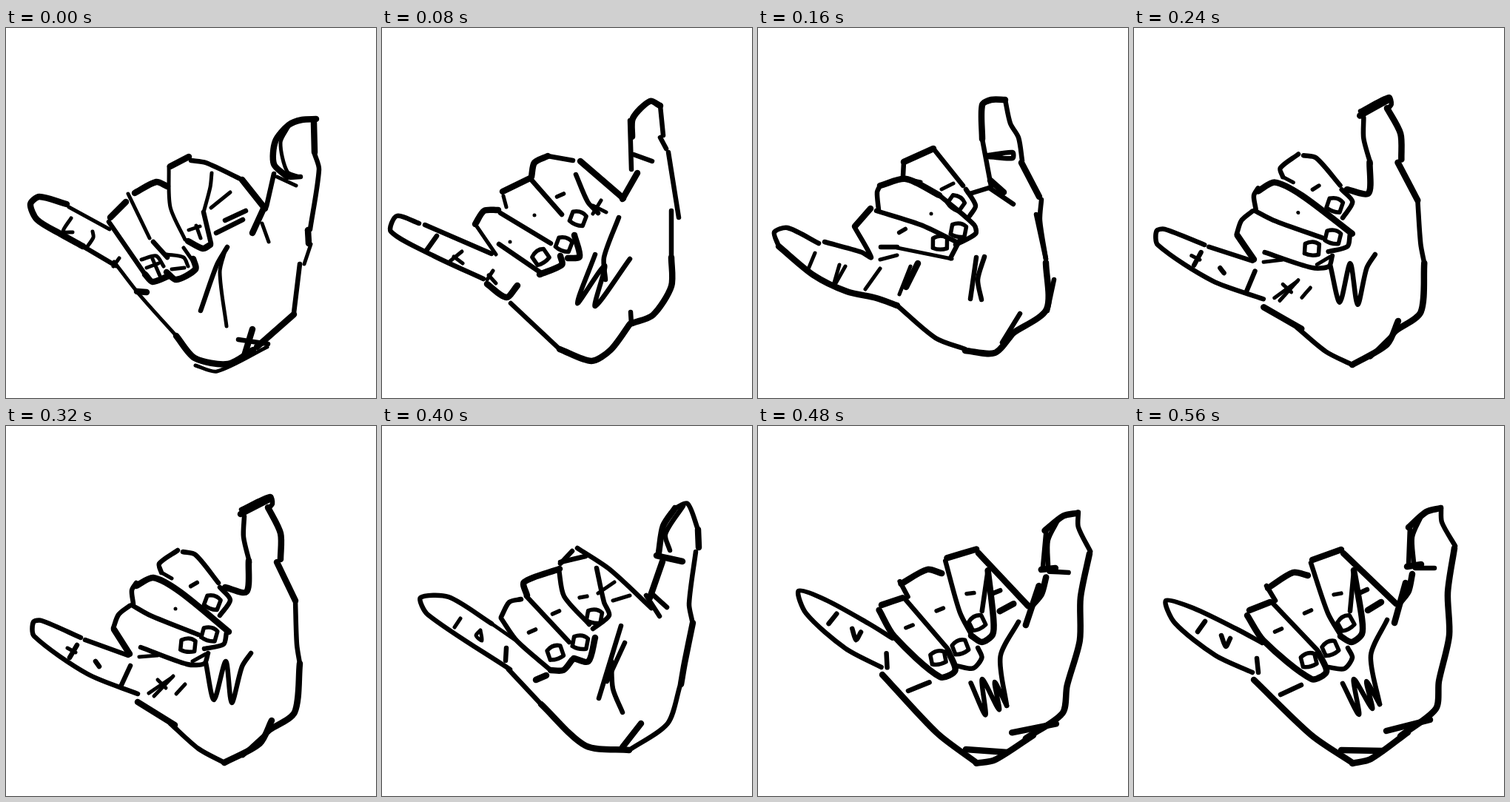
Recreate the animation shown at these times as an HTML page. Size 500 by 500 pixels, loop 640 ms.

```html
<!DOCTYPE html>
<html lang="en">
<head>
<meta charset="utf-8">
<title>Waving hand</title>
<style>
html, body { margin: 0; width: 100%; height: 100%; overflow: hidden; background: #fff; }
svg { display: block; width: 100vw; height: 100vh; }
path { fill: none; stroke: #000; stroke-linecap: round; stroke-linejoin: round; }
</style>
</head>
<body>
<svg id="stage" viewBox="0 0 500 500"></svg>
<script>
const BEAT = 80;

// Smooth curve through the points; sharp turns stay tight.
function curve(text) {
  const pts = text.split(' ').map(p => p.split(',').map(Number));
  const dist = (a, b) => Math.hypot(a[0] - b[0], a[1] - b[1]);
  const slope = i => {
    const a = pts[Math.max(0, i - 1)], b = pts[i], c = pts[Math.min(pts.length - 1, i + 1)];
    const len = dist(a, b) + dist(b, c);
    return [(c[0] - a[0]) / len, (c[1] - a[1]) / len];
  };
  let d = `M${pts[0]}`;
  for (let i = 1; i < pts.length; i++) {
    const a = pts[i - 1], b = pts[i], pull = dist(a, b) * 0.28;
    const s = slope(i - 1), t = slope(i);
    d += `C${a.map((v, k) => v + s[k] * pull)} ${b.map((v, k) => v - t[k] * pull)} ${b}`;
  }
  return d + 'h0';
}

const path = (width, d, move = '') => `<path stroke-width="${width}" d="${d}" transform="${move}"/>`;
const brush = width => (...lines) => lines.map(line => path(width, curve(line))).join('');
const bold = brush(8.5), mid = brush(6.5), fine = brush(5);
const spot = (x, y, turn) => `translate(${x} ${y}) rotate(${turn})`;
const nail = (x, y, turn) => path(5.5, 'M-9 8L-10 -5Q0 -12 9 -7L10 7Q0 11 -9 8', spot(x, y, turn));
const dash = (x, y, turn) => path(5.5, 'M-5 0H5', spot(x, y, turn));

const right = () =>
  bold('419,123 400,124 382,131 364,153 362,184 380,201', '416,128 417,168') +
  mid('417,170 423,191 411,272', '384,202 398,201', '362,197 352,241') +
  fine('382,133 371,155 380,194 397,201', '366,201 392,213', '346,264 355,289', '412,292 403,319') +
  bold('349,242 333,277', '408,273 409,291', '389,387 339,431', '230,416 255,446 300,454 334,435', '333,407 322,443') +
  mid('397,319 389,385', '314,421 354,427') +
  fine('146,316 180,360 230,416', '256,456 285,464 353,431') +
  bold('82,238 45,228 33,238 42,259 75,279 104,295', '177,356 190,357') +
  mid('104,295 148,321') +
  fine('85,242 140,272', '153,311 145,322', '88,257 77,275 90,276', '117,275 118,283 108,298') +
  bold('141,256 162,235', '188,333 198,343 220,335', '174,223 203,208 218,214', '217,330 230,340 256,326 253,312') +
  bold('222,187 247,174', '319,205 350,244', '246,288 266,298 276,293') +
  mid('139,262 188,333', '199,289 218,310', '250,179 270,182 319,205', '267,249 277,291') +
  fine('165,224 194,284', '240,297 254,317', '220,187 222,242 242,286', '278,196 276,215 267,249') +
  fine('303,222 277,243', '247,273 262,268', '257,267 263,284', '217,306 240,310 246,322', '224,326 241,324') +
  fine('183,313 203,308 213,322', '190,324 206,318', '198,312 208,335') +
  mid('284,277 320,259', '296,260 324,247', '299,296 285,320 263,382') +
  fine('297,298 289,330 298,403');

const middleLeft = () =>
  bold('376,105 362,99 339,122 338,147', '345,196 325,231', '391,310 391,349 366,388 338,399') +
  mid('376,105 380,145', '376,148 384,163', '335,125 337,191', '340,171 365,180') +
  mid('387,168 401,256', '391,247 391,310', '336,384 337,400', '174,372 240,434') +
  bold('335,400 309,435 283,450 240,434', '183,348 168,364 142,346') +
  mid('50,264 20,254 12,275 70,308 137,339', '58,266 148,305', '74,281 59,302') +
  fine('92,315 108,302', '97,309 109,318', '144,334 154,345', '150,328 142,340') +
  bold('126,265 138,247 157,246', '163,221 200,203', '213,333 243,320 241,308', '251,311 267,309 260,280') +
  bold('202,201 206,182 224,173', '268,180 326,230') +
  mid('224,173 258,179', '262,198 278,235 292,250', '200,203 243,252', '160,250 228,291', '158,292 215,331') +
  fine('154,306 128,268', '164,227 168,242', '173,289', '206,253', '285,240 303,249', '285,251 296,233') +
  nail(214, 309, -30) + nail(246, 292, 25) + nail(265, 257, 25) + dash(241, 226, -25) +
  mid('320,256 300,310 302,340') +
  mid('288,306 264,372 301,321 288,376 335,312');

const left = () =>
  bold('334,97 315,97 303,104 303,150', '314,206 332,222', '356,182 380,228', '389,317 390,380 345,412') +
  mid('303,150 315,214', '334,97 341,129 352,148 357,179', '311,172 344,168 344,176 312,174') +
  mid('314,217 345,238', '286,224 312,216', '383,232 381,260 389,312', '376,252 389,312') +
  mid('400,340 391,382', '354,386 330,425', '188,375 240,419 280,434') +
  bold('280,436 320,439 345,412', '28,295 75,334 120,356 160,365 188,375') +
  mid('82,291 40,270 22,276 28,295', '90,289 140,303 153,310 131,270') +
  fine('77,304 67,328', '110,320 103,344', '118,322 105,345', '165,325 145,353') +
  bold('131,268 152,244', '165,213 200,204 245,226', '197,181 237,163', '216,318 200,350') +
  mid('160,247 220,266 268,289', '166,296 188,296', '163,246 161,222 165,213', '260,311 273,286') +
  mid('245,226 292,266 294,278 267,293', '196,200 197,181', '237,163 277,213', '286,254 294,240 281,218') +
  fine('165,313 188,307', '188,297 262,312', '196,203 220,208', '234,251', '248,218 264,210', '206,322 191,360') +
  nail(246, 290, 5) + nail(271, 273, 15) + nail(268, 236, 40) + dash(195, 274, -30) +
  mid('295,310 287,366', '306,309 297,340 302,367');

const middleRight = () =>
  bold('317,119 356,99', '354,110 371,145 371,180', '366,184 391,236', '328,182 325,224 296,218') +
  mid('318,113 357,95 360,105 354,112', '322,122 321,150 329,184', '391,236 393,295 397,321') +
  bold('397,321 390,387 357,410', '359,398 343,429 295,455', '178,373 228,404') +
  mid('357,411 320,445', '295,455 260,436 222,402') +
  mid('101,286 48,263 37,265 38,284 110,335 178,362', '107,289 165,310') +
  mid('96,296 86,313', '121,318 126,325', '168,324 156,350') +
  fine('83,300 94,306', '180,312 205,310') +
  bold('146,275 167,308', '176,216 199,205 235,224 301,278') +
  mid('145,273 152,255 167,243', '170,242 195,256 260,282', '182,299 245,322 268,321 273,307') +
  mid('172,240 170,222 176,212', '298,279 294,295 268,301', '210,198 207,186 232,168') +
  mid('239,170 256,174 287,212', '289,218 303,235 289,256') +
  fine('210,198 224,206', '229,247', '252,318 270,308') +
  nail(246, 296, 10) + nail(275, 281, 20) + nail(279, 238, 25) + dash(254, 214, -30) +
  fine('224,340 193,361', '226,338 200,365', '205,343 216,354', '242,349 230,362') +
  mid('270,320 281,370 297,318 305,374 319,325 331,307');

const farRight = () =>
  bold('396,111 380,135 374,171', '371,175 388,179 406,183', '379,183 362,232', '427,140 428,164') +
  mid('396,111 413,105 427,140', '407,108 383,146 389,168', '357,229 375,257', '364,226 385,245') +
  mid('424,170 415,240 419,263', '403,350 386,402 334,438', '171,329 215,376') +
  bold('420,266 409,320 404,349', '350,402 325,434', '334,438 275,432 215,376', '208,343 222,337') +
  mid('148,267 90,231 52,232 62,255 173,329', '168,300 167,317') +
  fine('148,267 184,292', '106,260 98,272', '133,276 127,283 135,290 133,276') +
  bold('196,229 192,211 240,193', '228,330 245,330 257,316', '259,314 279,318 288,286') +
  mid('161,258 172,238 188,234', '161,260 182,290 228,330', '195,230 253,292', '239,194 246,230 280,268') +
  mid('241,186 257,169', '241,184 275,176', '264,165 308,194 364,246', '290,192 300,238 307,256 285,274') +
  nail(234, 306, -15) + nail(268, 292, 15) + nail(287, 257, 15) +
  dash(203, 277, -25) + dash(235, 252, -25) + dash(272, 231, -10) +
  fine('292,226 314,211', '312,236 335,229') +
  mid('323,270 293,368', '328,293 304,345', '310,318 312,355 325,387');

const nearRight = () =>
  bold('414,111 395,116 371,137', '369,190 388,187', '376,200 371,223 360,238', '367,212 352,266') +
  mid('415,110 416,130 434,162', '373,135 371,187', '388,122 376,150 378,185', '380,192 406,192') +
  bold('433,165 424,225 426,283 412,345 408,382 360,419', '341,412 400,397', '370,414 320,450 295,456') +
  bold('280,438 336,439', '295,455 240,418 162,343') +
  mid('173,293 140,275 80,246 43,236 55,266 110,310 160,333') +
  mid('96,264 86,278', '118,283 124,298 130,287', '166,314 168,333', '198,363 226,350') +
  bold('156,249 184,238', '153,256 175,290 240,342 260,332 249,306', '181,219 215,198 235,202') +
  bold('241,181 280,167', '283,172 354,240', '297,195 308,260 308,281 294,292 279,284', '316,249 334,238') +
  mid('188,240 248,303', '179,216 191,236', '263,326 284,328 295,313 289,300') +
  mid('239,185 262,253 280,284', '297,196 292,250', '304,226 315,221') +
  nail(236, 316, -10) + nail(265, 300, -20) + nail(286, 266, -25) +
  dash(195, 276, -25) + dash(235, 251, -25) + dash(275, 227, -10) +
  mid('342,262 320,310 332,376', '282,348 304,390 297,342 322,382 314,345 332,376');

// The hand also leans about the wrist at both ends of the swing.
const lean = (hand, turn) => () => `<g transform="rotate(${turn} 298 455)">${hand()}</g>`;
const swing = [
  right, middleLeft, left, lean(middleRight, -2),
  middleRight, farRight, lean(nearRight, 3), nearRight
];

const stage = document.getElementById('stage');
const poses = swing.map(draw => draw());
const start = performance.now();
let shown = -1;

function update(now) {
  const time = Math.max(0, now - start);
  const i = Math.floor(time / BEAT) % poses.length;
  if (i !== shown) stage.innerHTML = poses[shown = i];
  requestAnimationFrame(update);
}
update(start);
</script>
</body>
</html>
```
